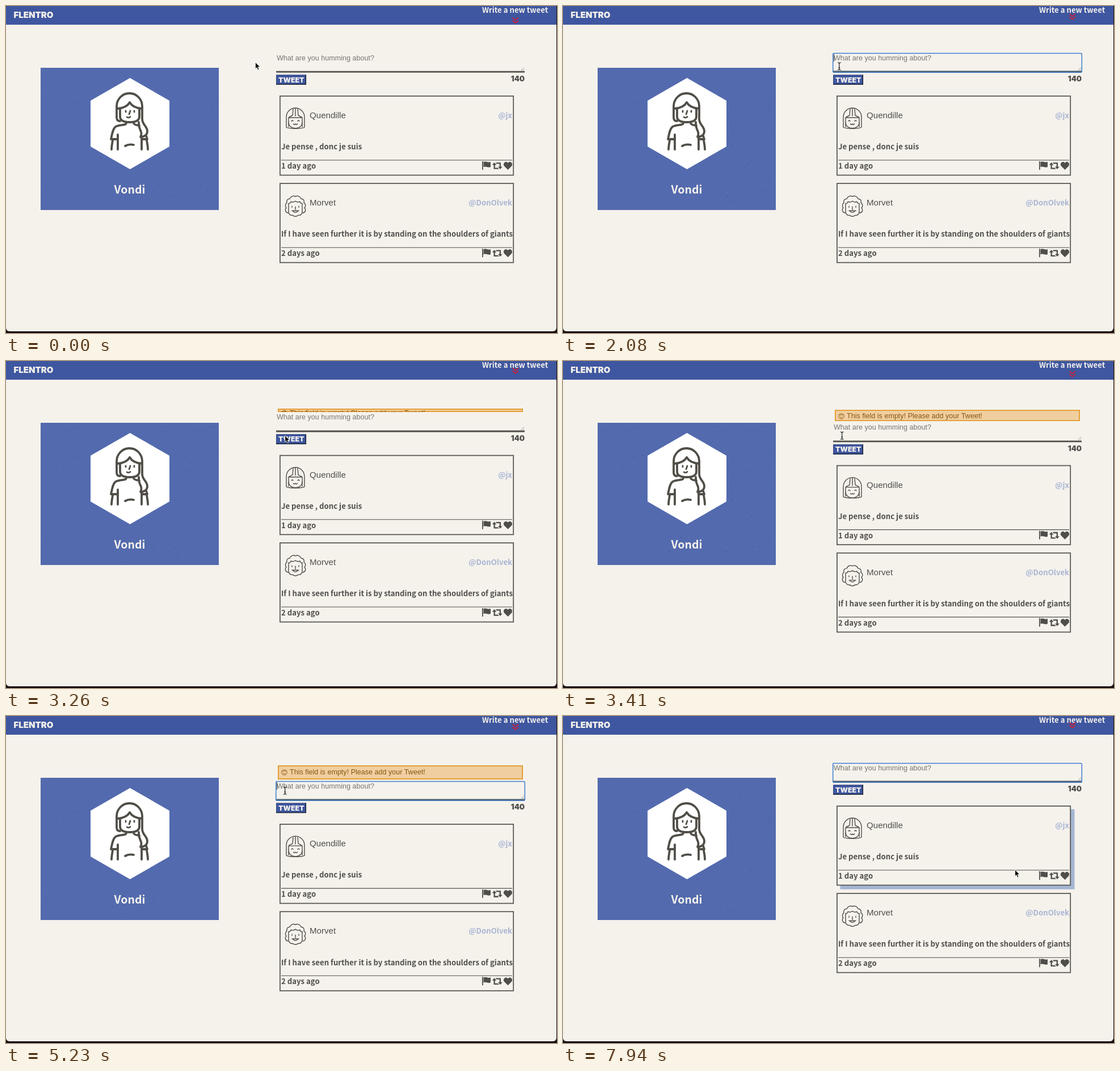
Recreate the animation shown at these times as an HTML page. Size 971 by 577 pixels, loop 8 s.

```html
<!DOCTYPE html>
<html lang="en">
<head>
<meta charset="utf-8">
<title>Feed</title>
<style>
  html, body { margin: 0; width: 100%; height: 100%; overflow: hidden; background: #190f12; }
  svg { display: block; }
  text { font: 700 13.17px 'Noto Sans CJK JP', 'Noto Sans CJK SC', 'Noto Sans CJK', 'Open Sans', sans-serif; fill: #504e4b; }
  .arial { font: 12.58px 'Liberation Sans', Arial, sans-serif; }
  .name { font-size: 15.1px; }
  .block { font: 900 12.4px Inter, sans-serif; }
  .handle { fill: #a8b5d3; text-anchor: end; }
  .line { fill: none; stroke: #504e47; stroke-linecap: round; stroke-linejoin: round; }
  .face { stroke-width: 1.4; }
</style>
</head>
<body>
<svg id="stage" width="971" height="577" viewBox="0 0 971 577">
  <defs>
    <g id="icons" fill="#504e4b">
      <path d="M839 274h1.8v15H839zM841.5 275c5-2 7 2 12.500 0v9c-5.500 2-7.500-2-12.500 0z"/>
      <path d="M860.500 276l4 4.500h-2.700v5h5l2 2.300h-9.300v-7.300h-2.700zM871 288l-4-4.500h2.700v-5h-5l-2-2.300h9.300v7.300h2.700z"/>
      <path d="M884.500 289l-6.500-6.500c-3.500-4.500 2.500-10.500 6.500-5.500c4-5 10 1 6.500 5.500z"/>
    </g>
  </defs>

  <path d="M0 0H970V568a6 6 0 0 1-6 6H6a6 6 0 0 1-6-6z" fill="#f5f2ec"/>
  <path d="M0 0H970V33H0z" fill="#3f57a0"/>
  <text class="block" x="13.500" y="21" style="font-size:15px;fill:#f5f2ec">FLENTRO</text>
  <text x="839" y="11.500" style="fill:#f5f2ec">Write a new tweet</text>
  <path id="chevrons" d="M892.500 20.500l5.200 4.200 5.200-4.200M892.500 25.700l5.200 4.200 5.200-4.200" fill="none" stroke="#c0243f" stroke-width="2"/>

  <path d="M61 109H375V360H61z" fill="#536aae"/>
  <g id="specks"></g>
  <path d="M218.500 127L288 167V248L218.500 288L149 248V167z" fill="#fff"/>
  <g class="line" stroke-width="3.800">
    <path d="M201 203c-4 0-6-2-6-6V177a22.500 23 0 0 1 45 0V199c0 11 9 13 9 22c0 7-6 10-12 10c3-6 1-9-1-14c-2-4-2-8-2-12"/>
    <path d="M197 181c11-1 17-4 21-11c4 7 11 10 21 11"/>
    <path d="M201 183v12c0 8 7 10 17 10s17-3 17-10v-12"/>
    <path d="M212 207c-1 4-13 2-19 6c-5 4-6 13-8 22h11M225 207c1 3 6 3 10 4M239 235h10l-2-6"/>
    <path d="M188 237c-1 6-2 11-2 16M197 227v26M239 231v22M248 237c1 6 2 11 2 16M210 247c5-3 11-3 15-2"/>
    <path d="M211 185v2M226 185v2M219 185l-2 6M213 196c2 1.500 5 1 6-.5" stroke-width="2.800"/>
  </g>
  <text x="218" y="330.500" text-anchor="middle" style="font-size:19.500px;fill:#f5f2ec">Vondi</text>

  <svg id="alert" x="479" width="432" height="25">
    <rect width="100%" height="100%" fill="#f0cea0" stroke="#e39a2b" stroke-width="3.600"/>
    <g id="alertBody">
      <g fill="none" stroke="#95651d">
        <circle cx="11.500" cy="-4" r="4.700"/>
        <path d="M7 -6.500h9M9.500 -4v1M13.500 -4v1M9.500 -1.500h4"/>
      </g>
      <text class="arial" x="21" style="fill:#87570f">This field is empty! Please add your Tweet!</text>
    </g>
  </svg>

  <g id="feed">
    <text class="arial" x="477" y="95.700" style="fill:#77756f">What are you humming about?</text>
    <path d="M476 116.200H914" stroke="#504e47" stroke-width="2.800"/>
    <path d="M907.500 114l5.500-5.500M910.500 114l2.500-2.500" stroke="#8b8985" stroke-width=".8"/>
    <g id="focus">
      <rect x="475.700" y="83.500" width="438.600" height="33.500" rx="1.500" fill="none" stroke="#3f7fd0" stroke-width="1.500"/>
      <path d="M476.500 115.200H913.500" stroke="#4c5c66" stroke-width="1.500"/>
    </g>
    <path id="caret" d="M477.500 85V98" stroke="#333"/>
    <path d="M476 121.500H529V139H476z" fill="#3f57a0"/>
    <path id="bevelA" d="M476.500 139V122H529" fill="none"/>
    <path id="bevelB" d="M476 138.300H528.300V121.500" fill="none"/>
    <text class="block" x="480" y="134.700" style="fill:#f5f2ec">TWEET</text>
    <text class="block" x="914" y="133" text-anchor="end" style="font-size:13px">140</text>
    <rect id="shadow" x="482" y="158" width="413" height="141.300" fill="#a5b6d2"/>
    <g id="cards"></g>
  </g>

  <path id="arrow" d="M0 0V11.300l2.600-2.300 1.900 4.200 2-.9-1.900-4.100 3.500-.3z" fill="#0c0c0c" stroke="#fff" stroke-width=".7"/>
  <path id="beam" d="M-2.800-6.500q2.800 0 2.800 1.800q0-1.800 2.800-1.800M0-5V5M-2.800 6.500q2.800 0 2.800-1.800q0 1.800 2.800 1.800M-1.500 2.500h3" fill="none" stroke="#222" stroke-width="1.200"/>
</svg>

<script>
const $ = id => document.getElementById(id);
const clamp = v => Math.max(0, Math.min(1, v));
const swing = p => 0.5 - Math.cos(Math.PI * clamp(p)) / 2;
const show = (id, on) => $(id).style.display = on ? '' : 'none';
const move = (id, x, y) => $(id).setAttribute('transform', `translate(${x} ${y})`);

const bob = `<path d="M494 214V196a16 16 0 0 1 32 0V214c-5 3-27 3-32 0zM498 213V197h24v16M499 196l6-3 1-11M521 196l-6-3-1-11M510 181v13"/>
  <path d="M498 206c1 13 23 13 24 0M503 203q1.500-2 3 0M514 203q1.500-2 3 0M506.500 208q1.700 2.500 3.500 0q1.800 2.500 3.500 0"/>`;
const curls = `<path d="M497 211c-5-1-6-7-3-9c-3-3-1-8 1-9c-1-5 2-7 5-7c2-5 7-6 10-4c3-2 8-1 10 4c4 0 6 3 5 7c3 2 4 6 1 9c3 3 2 8-3 9"/>
  <path d="M498 194q3 1 4-3q4 2 8-1q4 3 8 1q1 4 4 3V210q-2 6-7 5q-5 4-10 0q-5 1-7-5zM504 199v2M516 199v2M510 200v5M504 207h12M505 207q5 6 10 0"/>`;

const card = (y, face, name, handle, words, age) => `<g transform="translate(0 ${y})">
  <rect x="482.900" y="158.900" width="411.300" height="139.600" fill="#f5f2ec" stroke="#5b5955" stroke-width="1.800"/>
  <g class="line face">${face}</g>
  <text class="arial name" x="535" y="198">${name}</text>
  <text class="handle" x="892" y="198">${handle}</text>
  <text x="485" y="253.300">${words}</text>
  <path d="M485 272H892" stroke="#504e4b" stroke-width="1.100"/>
  <text x="485" y="287">${age}</text>
  <use href="#icons"/></g>`;

$('cards').innerHTML =
  card(0, bob, 'Quendille', '@jx', 'Je pense , donc je suis', '1 day ago') +
  card(154.2, curls, 'Morvet', '@DonOlvek',
    'If I have seen further it is by standing on the shoulders of giants', '2 days ago');

let seed = 7;
const rand = () => (seed = seed * 16807 % 2147483647) / 2147483647;
$('specks').innerHTML = Array.from({ length: 170 }, () =>
  `<circle cx="${62 + rand() * 312}" cy="${110 + rand() * 249}" r="${0.4 + rand() * 0.6}"
    fill="${rand() < 0.7 ? '#3c5090' : '#6b80be'}" opacity=".6"/>`).join('');

// pointer stops: time, x, y
const stops = [
  [0, 439.5, 99.5], [60, 439.5, 99.5], [720, 486, 102], [1900, 486, 102], [2630, 491.7, 131.7],
  [6020, 491.7, 131.7], [6500, 502.5, 174], [6620, 503, 175], [7930, 796.5, 271.5], [8000, 796.5, 271.5]
];
function pointer(t) {
  const i = stops.findIndex(s => s[0] > t);
  const [a, b] = [stops[i - 1], stops[i]];
  const p = swing((t - a[0]) / (b[0] - a[0]));
  return [a[1] + (b[1] - a[1]) * p, a[2] + (b[2] - a[2]) * p];
}

function draw(t) {
  const beat = (t + 910) % 950;
  move('chevrons', 0, -9.3 * Math.sin(Math.PI * clamp(beat / 570)));

  const open = swing((t - 3130) / 400) - swing((t - 5225) / 190);
  const drop = 32.2 * open;
  move('feed', 0, drop);
  show('alert', open > 0.01);
  $('alert').setAttribute('y', 83 + 4 * open);
  $('alert').setAttribute('height', 25 * open);
  move('alertBody', 0, 10.5 + 6 * open);

  const since = t >= 5130 ? t - 5130 : t < 3040 ? t - 1050 : -1;
  show('focus', since >= 0);
  show('caret', since >= 0 && since % 1000 < 500);

  const pressed = t >= 3040 && t < 3130;
  $('bevelA').setAttribute('stroke', pressed ? '#1c2437' : '#34477f');
  $('bevelB').setAttribute('stroke', pressed ? '#5067ab' : '#1c2437');
  $('bevelB').setAttribute('stroke-width', 1.5);

  const hover = 1 - (1 - clamp((t - 6330) / 300)) ** 2;
  move('shadow', 6.5 * hover, 6.5 * hover);
  $('shadow').style.opacity = hover;

  const [x, y] = pointer(t);
  const typing = x > 476 && y > 83 + drop && y < 117 + drop;
  show('beam', typing);
  show('arrow', !typing);
  move('beam', x, y);
  move('arrow', x, y);
}

const start = performance.now();
function tick() {
  draw((performance.now() - start) % 8000);
  requestAnimationFrame(tick);
}
tick();
</script>
</body>
</html>
```
